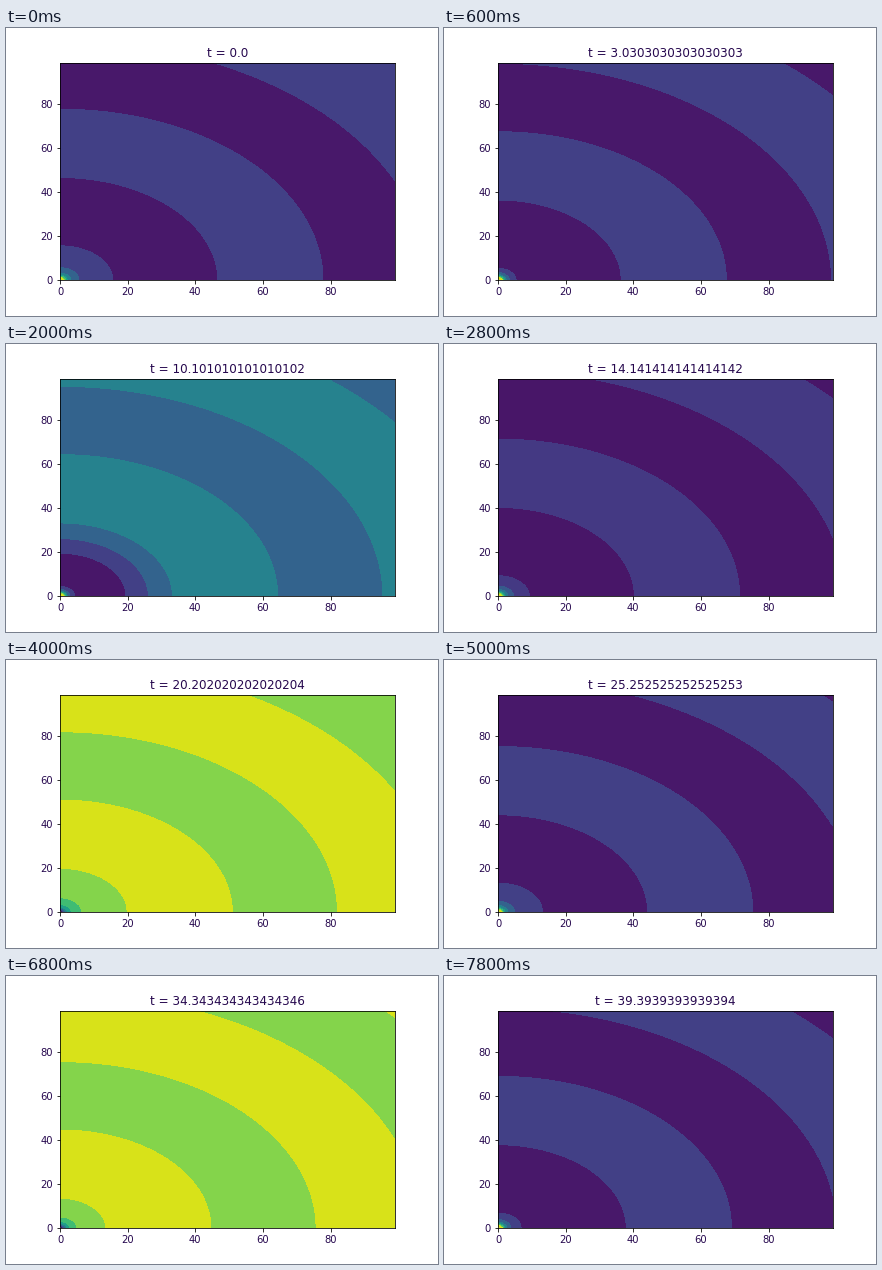
Animation, 432 px wide and 288 px high, one loop 8000 ms. Source, as a matplotlib script:

```python
import numpy as np
import matplotlib.pyplot as plt
from matplotlib.animation import FuncAnimation

FRAMES = 40
INTERVAL = 200  # ms
N = 100
K = 0.1
OMEGA = np.sqrt(3)
INK = "#26084e"

plt.rcParams.update({
    "font.family": "DejaVu Sans",
    "font.size": 10,
    "axes.titlesize": 12,
    "axes.titlecolor": INK,
    "xtick.labelcolor": INK,
    "ytick.labelcolor": INK,
    "figure.subplot.bottom": 0.125,
})

times = np.linspace(0, 100, N)
axis = np.linspace(0, 100, N)
x, y = np.meshgrid(axis, axis)
# The centre is singular, so it is masked out.
r = np.ma.masked_equal(np.hypot(x, y), 0)

fig, ax = plt.subplots(figsize=(6, 4), dpi=72)


def wave(t):
    """Spherical wave that decays with distance."""
    return np.ma.cos(K * r - OMEGA * t) / r


def draw(i):
    ax.clear()
    ax.contourf(wave(times[i]), cmap="viridis")
    ax.set_title(f"t = {times[i]}")


anim = FuncAnimation(fig, draw, frames=FRAMES, init_func=lambda: draw(0),
                     interval=INTERVAL, repeat=True, repeat_delay=0)
plt.show()
```
